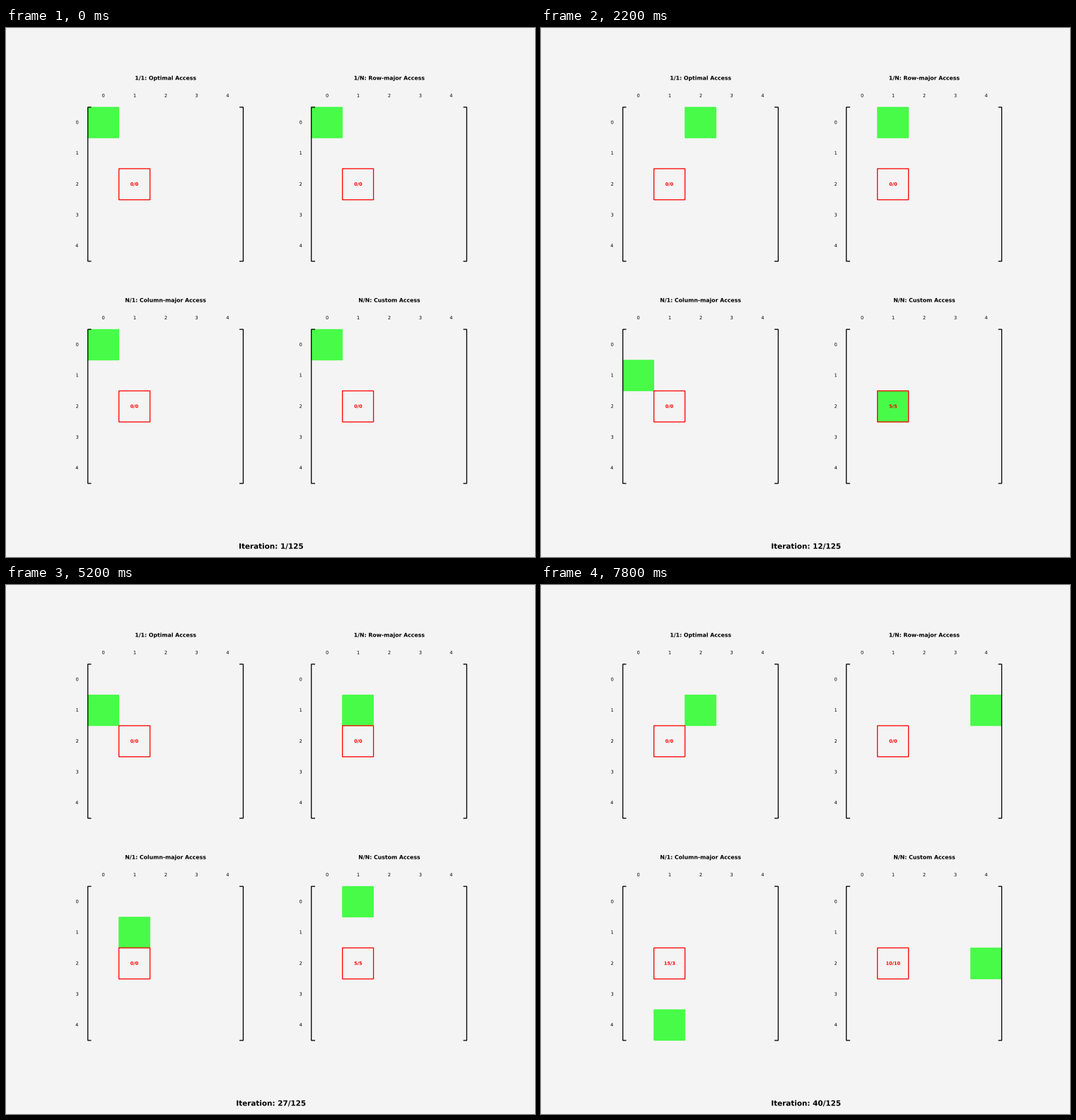
Recreate the animation shown at these times as a matplotlib script. Size 748 by 748 pixels, loop 8000 ms.

```python
import math

import matplotlib.pyplot as plt
from matplotlib.animation import FuncAnimation
from matplotlib.patches import PathPatch, Rectangle
from matplotlib.path import Path
from matplotlib.textpath import TextPath

STAGE, UNITS = 748, 1600      # pixels, layout units (16 in at 100 per inch)
N, STEPS, INTERVAL = 5, 40, 200
PANEL_W, PANEL_H = 1240 / 2.2, 560
CELL_W, CELL_H = PANEL_W / 6, PANEL_H / 6
MARK_ROW, MARK_COL = 2, 1

fig = plt.figure(figsize=(16, 16), dpi=STAGE / 16, facecolor="#f4f4f4")
ax = fig.add_axes([0, 0, 1, 1])
ax.set_xlim(0, UNITS)
ax.set_ylim(UNITS, 0)
ax.axis("off")


def snap(v):
    return math.floor(v + 0.5) + 0.5


def text_path(text, x, y, points, bold=False, middle=True):
    """Outline of a text centred on x, with y its middle or its baseline."""
    size = points * 100 / 72
    font = dict(family="DejaVu Sans", weight="bold" if bold else "normal")
    path = TextPath((0, 0), text, size=size, prop=font)
    left = round(x - path.get_extents().width / 2)
    base = round(y + (0.276 * size if middle else 0)) + 1
    return Path(path.vertices * [1, -1] + [left, base], path.codes)


def add_text(*args, color="black", **kw):
    patch = PathPatch(text_path(*args, **kw), fc=color, ec="none", lw=0,
                      snap=False, zorder=4)
    return ax.add_patch(patch)


class Panel:
    def __init__(self, title, column, row, cell, count):
        self.left = 200 + column * 1.2 * PANEL_W
        self.top = 192 + row * 1.2 * PANEL_H
        self.cell, self.count = cell, count

        add_text(title, self.x(2), self.top - 0.05 * PANEL_H - 8.33, 12,
                 bold=True, middle=False)
        for i in range(N):
            add_text(str(i), self.x(i), self.y(-0.87), 10)
            add_text(str(i), self.x(-0.85), self.y(i), 10)
        self.bracket(-0.5, -0.4)
        self.bracket(4.5, 4.4)

        self.active = self.box(fc="lime", ec="lime", lw=1, alpha=0.7, zorder=1)
        mark = self.box(fc="none", ec="red", lw=2, zorder=3)
        self.place(mark, MARK_ROW, MARK_COL)
        self.label = add_text("0/0", self.x(MARK_COL), self.y(MARK_ROW), 10,
                              bold=True, color="red")

    def x(self, col):
        return self.left + (col + 1) * CELL_W

    def y(self, row):
        return self.top + (row + 1) * CELL_H

    def bracket(self, side, tip):
        xs = [snap(self.x(v)) for v in (tip, side, side, tip)]
        ys = [snap(self.y(v)) for v in (-0.5, -0.5, 4.5, 4.5)]
        ax.plot(xs, ys, color="black", lw=2, solid_joinstyle="miter",
                snap=False, zorder=2)

    def box(self, **style):
        return ax.add_patch(Rectangle((0, 0), 1, 1, snap=False, **style))

    def place(self, box, row, col):
        x0, x1 = (snap(self.x(col + d)) for d in (-0.5, 0.5))
        y0, y1 = (snap(self.y(row + d)) for d in (-0.5, 0.5))
        box.set_bounds(x0, y0, x1 - x0, y1 - y0)

    def show(self, step):
        self.place(self.active, *self.cell(*indices(step)))
        hits = sum(self.cell(*indices(s)) == (MARK_ROW, MARK_COL)
                   for s in range(step + 1))
        a, b = self.count
        self.label.set_path(text_path(f"{a * hits}/{b * hits}",
                                      self.x(MARK_COL), self.y(MARK_ROW),
                                      10, bold=True))


def indices(step):
    return step // (N * N), step // N % N, step % N


panels = [
    Panel("1/1: Optimal Access", 0, 0, lambda i, j, k: (i, j), (1, 1)),
    Panel("1/N: Row-major Access", 1, 0, lambda i, j, k: (i, k), (1, N)),
    Panel("N/1: Column-major Access", 0, 1, lambda i, j, k: (k, i), (N, 1)),
    Panel("N/N: Custom Access", 1, 1, lambda i, j, k: (j, k), (N, N)),
]
counter = add_text("Iteration", UNITS / 2, 0.98 * UNITS, 16, bold=True)


def update(step):
    for panel in panels:
        panel.show(step)
    counter.set_path(text_path(f"Iteration: {step + 1}/{N ** 3}",
                               UNITS / 2, 0.98 * UNITS, 16, bold=True))
    return []


anim = FuncAnimation(fig, update, frames=STEPS, interval=INTERVAL,
                     init_func=lambda: update(0), repeat=True, repeat_delay=0)
plt.show()
```
